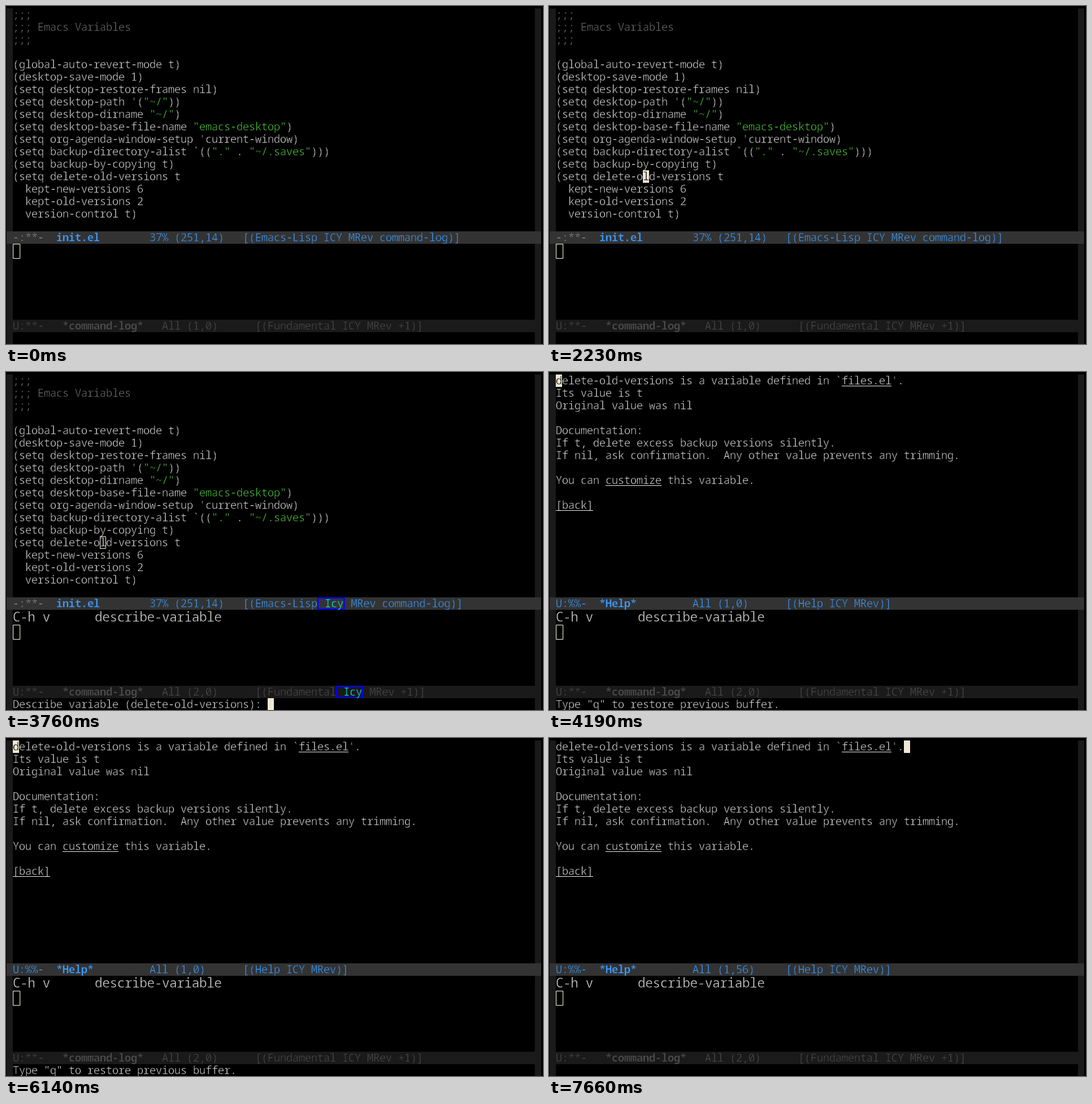
These frames come from a looping animation (864 px wide and 543 px high, 8000 ms). An HTML page with a canvas:

```html
<!DOCTYPE html>
<html lang="en">
<head>
<meta charset="utf-8">
<title>Describe variable</title>
<style>
  html, body { margin: 0; width: 100%; height: 100%; overflow: hidden; background: #000; }
  canvas { display: block; }
</style>
</head>
<body>
<canvas id="stage" width="864" height="543"></canvas>
<script>
const ctx = document.getElementById('stage').getContext('2d');
const LOOP = 8000, LEFT = 11, TOP = 4, CELL = 10, ROW = 20;
const C = {
  back: '#000', text: '#d8d8d8', comment: '#707070', string: '#50c83c', cursor: '#eee8d5',
  fringe: '#1a1a1a', active: '#333333', blue: '#3a9cff', state: '#909090',
  inactive: '#1a1a1a', faded: '#4d4d4d', cyan: '#00ffff', box: '#0000ff'
};

const code = `;;;
;;; Emacs Variables
;;;

(global-auto-revert-mode t)
(desktop-save-mode 1)
(setq desktop-restore-frames nil)
(setq desktop-path '("~/"))
(setq desktop-dirname "~/")
(setq desktop-base-file-name "emacs-desktop")
(setq org-agenda-window-setup 'current-window)
(setq backup-directory-alist \`(("." . "~/.saves")))
(setq backup-by-copying t)
(setq delete-old-versions t
  kept-new-versions 6
  kept-old-versions 2
  version-control t)`.split('\n');

// Underscores enclose links.
const help = `delete-old-versions is a variable defined in \`_files.el_'.
Its value is t
Original value was nil

Documentation:
If t, delete excess backup versions silently.
If nil, ask confirmation.  Any other value prevents any trimming.

You can _customize_ this variable.

_[back]_`.split('\n');

const colX = col => LEFT + col * CELL;
const rowY = row => TOP + row * ROW;

function rect(x, y, w, h, color) {
  ctx.fillStyle = color;
  ctx.fillRect(x, y, w, h);
}

function outline(x, y, w, h, color, line = 1) {
  ctx.strokeStyle = color;
  ctx.lineWidth = line;
  ctx.strokeRect(x + line / 2, y + line / 2, w - line, h - line);
}

// Draws on the character grid and returns the x after the last cell.
// A fine stroke in the background colour keeps the letters thin.
function text(str, x, y, color, { bold = false, cell = CELL, back = C.back } = {}) {
  ctx.font = `${bold ? 700 : 300} ${cell * 1.75}px "Noto Sans Mono", "Liberation Mono", monospace`;
  ctx.textAlign = 'center';
  ctx.lineJoin = 'round';
  ctx.lineWidth = 0.45;
  ctx.strokeStyle = back;
  ctx.fillStyle = color;
  for (const ch of str) {
    ctx.fillText(ch, x + cell / 2, y + cell * 1.6);
    ctx.strokeText(ch, x + cell / 2, y + cell * 1.6);
    x += cell;
  }
  return x;
}

function codeWindow() {
  code.forEach((line, row) => {
    let x = LEFT;
    for (const part of line.split(/("[^"]*")/)) {
      const color = line[0] === ';' ? C.comment : part[0] === '"' ? C.string : C.text;
      x = text(part, x, rowY(row), color);
    }
  });
}

function helpWindow() {
  help.forEach((line, row) => {
    let x = LEFT;
    line.split('_').forEach((part, i) => {
      const end = text(part, x, rowY(row), C.text);
      if (i % 2) rect(x, rowY(row) + 18, end - x, 1, C.text);
      x = end;
    });
  });
}

function cursor(col, row, ch = ' ') {
  rect(colX(col), rowY(row), CELL, ROW, C.cursor);
  text(ch, colX(col), rowY(row), '#000', { back: C.cursor });
}

function modeLine(y, back, color, stateColor, state, [nameCol, name], [posCol, pos], [modeCol, modes], icy) {
  const write = (str, x, ink = color, bold = false) => text(str, x, y, ink, { bold, back });
  rect(1, y, 860, ROW, back);
  write(state, LEFT, stateColor);
  write(name, colX(nameCol), color, true);
  write(pos, colX(posCol));
  if (!icy) return write(modes, colX(modeCol));
  const [before, after] = modes.split(' ICY');
  const x = write(before, colX(modeCol));
  outline(x, y, 44, ROW, C.box, 2);
  write(' Icy', x + 2, C.cyan);
  write(after, x + 44);
}

function logWindow(logged, counted, icy) {
  if (logged) {
    text('C-h v', LEFT, 382, C.text, { cell: 12 });
    text('describe-variable', LEFT + 11 * 12, 382, C.text, { cell: 12 });
  }
  outline(LEFT, logged ? 406 : 382, 12, 24, C.cursor);
  modeLine(504, C.inactive, C.faded, C.faded, 'U:**-', [8, '*command-log*'],
    [24, `All (${counted ? 2 : 1},0)`], [39, '[(Fundamental ICY MRev +1)]'], icy);
}

function draw(t) {
  const within = (from, to) => t >= from && t < to;
  const prompting = within(2730, 4190), showHelp = t >= 4190;
  const icy = within(2770, 4190);

  rect(0, 0, 864, 543, C.back);
  rect(1, TOP, 10, 539, C.fringe);
  rect(851, TOP, 10, 539, C.fringe);

  if (showHelp) {
    helpWindow();
    if (t >= 7620) cursor(56, 0);
    else if (!within(4650, 5140) && !within(5640, 6140) && !within(6640, 7130)) cursor(0, 0, 'd');
    modeLine(362, C.active, C.blue, C.blue, 'U:%%-', [7, '*Help*'],
      [22, `All (1,${t >= 7660 ? 56 : 0})`], [37, '[(Help ICY MRev)]']);
    if (t < 7620) text('Type "q" to restore previous buffer.', LEFT, rowY(26), C.text);
  } else {
    codeWindow();
    if (prompting) outline(colX(14), rowY(13), CELL, ROW, C.cursor);
    else if (within(900, 1240)) cursor(14, 12, 'y');
    else if (within(460, 1740) || t >= 2230) cursor(14, 13, 'l');
    modeLine(362, C.active, C.blue, C.state, '-:**-', [7, 'init.el'],
      [22, `37% (${within(940, 1280) ? 250 : 251},14)`],
      [37, '[(Emacs-Lisp ICY MRev command-log)]'], icy);
    if (prompting) {
      text('Describe variable (delete-old-versions): ', LEFT, rowY(26), C.text);
      if (!within(3260, 3760)) cursor(41, 26);
    }
  }
  logWindow(t >= 2730, t >= 2770, icy);
}

const start = performance.now();
function frame() {
  draw((performance.now() - start) % LOOP);
  requestAnimationFrame(frame);
}
frame();
</script>
</body>
</html>
```
